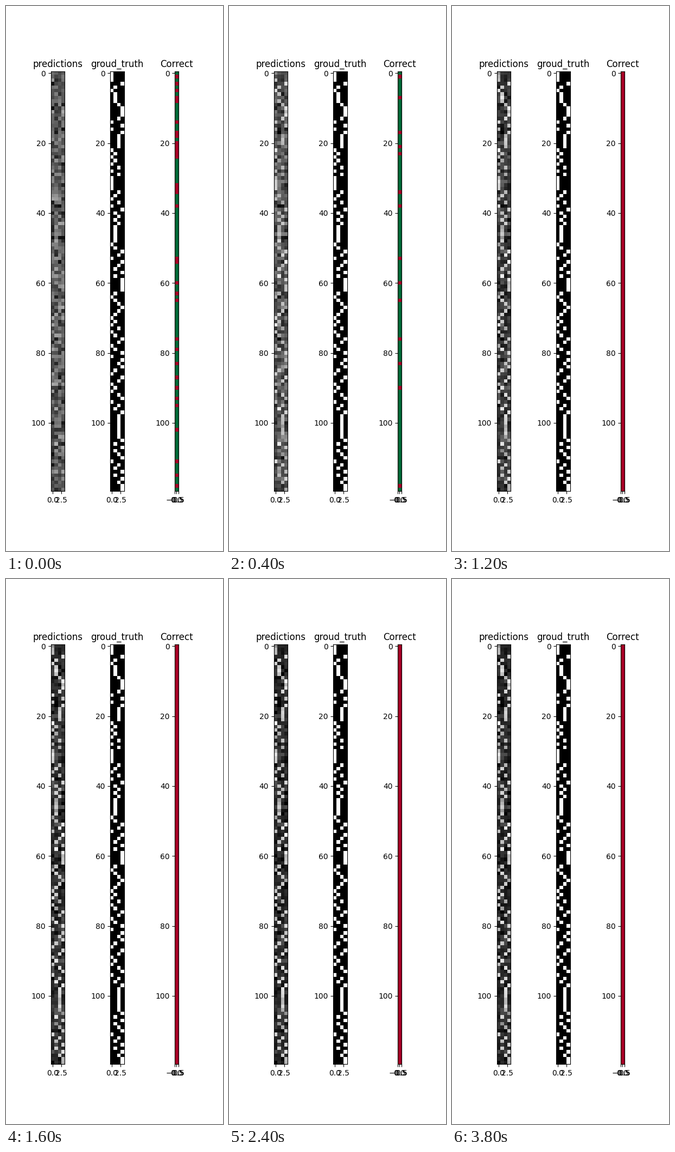
These frames come from a looping animation (400 px wide and 1000 px high, 4000 ms). A matplotlib script:

```python
import math

import numpy as np
import matplotlib.pyplot as plt
from matplotlib.animation import FuncAnimation

FRAMES, INTERVAL = 20, 200
ROWS, CLASSES = 120, 4
SOLVED = 5           # first step without a mistake
MISSES = 33          # mistakes at the start
HARDEST = [1, 17, 76]

# Long stretches of one class: (first row, length, class).
RUNS = [(0, 2, 0), (6, 2, 1), (11, 2, 3), (18, 3, 2), (31, 3, 0),
        (44, 5, 1), (59, 4, 3), (98, 6, 2), (118, 2, 3)]

rng = np.random.default_rng(7)


def make_labels():
    """Random classes that never repeat, interrupted by the long runs."""
    labels = np.cumsum(rng.integers(1, CLASSES, ROWS)) % CLASSES
    for start, length, label in RUNS:
        labels[start:start + length] = label
    return labels


labels = make_labels()
truth = np.eye(CLASSES)[labels]
samples = np.arange(ROWS)
early, late = np.clip(rng.normal(size=(2, ROWS, CLASSES)), -2, 2)

# Samples from hardest to easiest; the easy ones are learned first.
others = np.setdiff1d(samples, HARDEST)
by_difficulty = np.concatenate([HARDEST, rng.permutation(others)])


def missed(step):
    left = max(0, 1 - step / SOLVED)
    return by_difficulty[:math.ceil(MISSES * left ** 1.7)]


def scores(step):
    fresh = math.exp(-step / 5)
    noise = fresh * early + math.sqrt(1 - fresh ** 2) * late
    off = .15 + .19 * math.exp(-(step / 6) ** 2) + (.07 + .07 * fresh) * noise
    on = .77 - .27 * math.exp(-step) + .1 * noise
    p = np.where(truth == 1, on, off)

    # The true class leads its row, except where the sample is missed.
    rival = np.where(truth == 1, 0, p).max(axis=1)
    lead = np.maximum(p[samples, labels], 1.05 * rival)
    wrong = missed(step)
    lead[wrong] = .85 * rival[wrong]
    p[samples, labels] = lead
    return np.clip(np.round(p * 64) / 64, 0, 1)


def verdict(step):
    # A uniform column falls to the low end of the colormap.
    hits = np.full((ROWS, 1), float(step < SOLVED))
    hits[missed(step)] = 0
    return hits


fig, axes = plt.subplots(1, 3, figsize=(4, 10), dpi=100)


def panel(ax, title, data, cmap):
    ax.set_title(title)
    return ax.imshow(data, cmap=cmap, vmin=0, vmax=1)


pred = panel(axes[0], "predictions", scores(0), "gray")
panel(axes[1], "groud_truth", truth, "gray")
correct = panel(axes[2], "Correct", verdict(0), "RdYlGn")


def update(step):
    pred.set_data(scores(step))
    correct.set_data(verdict(step))
    return pred, correct


anim = FuncAnimation(fig, update, frames=FRAMES, interval=INTERVAL,
                     repeat=True, repeat_delay=0)
plt.show()
```
